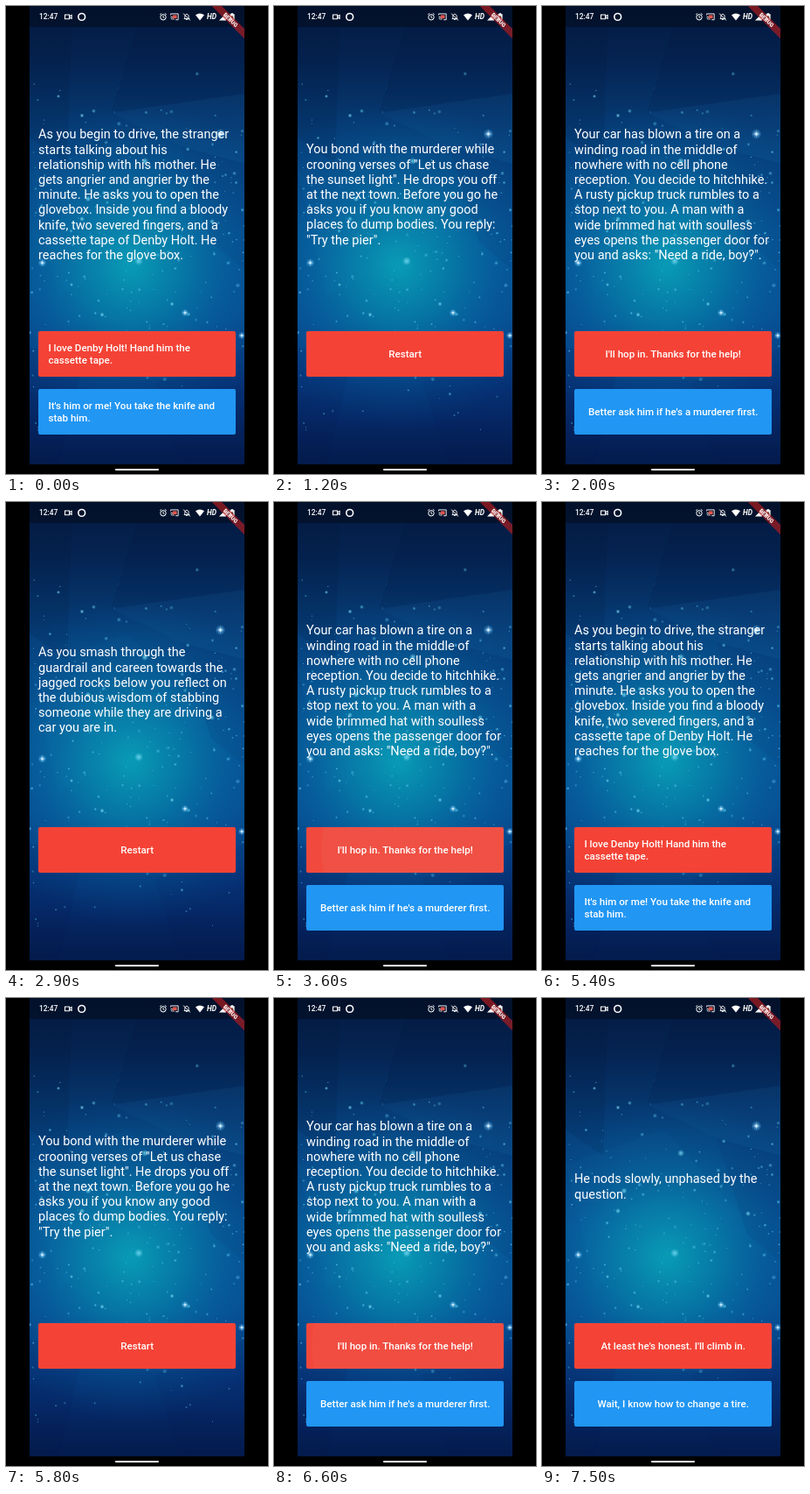
These frames come from a looping animation (300x534 px, 8 s). An HTML page with a canvas:

```html
<!DOCTYPE html>
<html lang="en">
<head>
<meta charset="utf-8">
<title>Hitchhike story</title>
<style>
  html, body { margin: 0; width: 100%; height: 100%; overflow: hidden; background: #000; }
  #stage { position: relative; width: 300px; height: 534px; overflow: hidden; background: #000; color: #fff; font-family: Roboto, sans-serif; }
  #sky, #bar { position: absolute; left: 0; top: 0; }
  #story {
    position: absolute; left: 37px; top: 215.3px; margin: 0; transform: translateY(-50%);
    font-size: 14.53px; line-height: 17.22px; white-space: pre;
  }
  .choice {
    position: absolute; left: 37.4px; width: 225.6px; height: 52px; border-radius: 2px; overflow: hidden;
    display: flex; align-items: center; justify-content: center;
    font-weight: 500; font-size: 11.6px; line-height: 13.6px; white-space: pre;
  }
  .choice.wide { justify-content: flex-start; padding-left: 11px; width: 214.6px; }
  #red { top: 371.4px; background: #f44336; }
  #blue { top: 437.2px; background: #2196f3; }
  .choice span { position: relative; top: .5px; }
  .choice i { position: absolute; left: 0; top: 0; width: 226px; height: 52px; opacity: 0; }
  #handle { position: absolute; left: 125px; top: 528px; width: 50px; height: 2px; border-radius: 1px; background: #fff; }
</style>
</head>
<body>
<div id="stage">
  <canvas id="sky" width="300" height="534"></canvas>
  <p id="story"></p>
  <div id="red" class="choice"><i></i><span></span></div>
  <div id="blue" class="choice"><i></i><span></span></div>
  <svg id="bar" width="300" height="60" font-family="Roboto, sans-serif" fill="#fff">
    <defs><clipPath id="app"><rect x="27" width="246" height="60"/></clipPath></defs>
    <rect x="27" width="246" height="24" fill="#000" opacity=".36"/>
    <text x="38" y="15.4" font-size="8.4" font-weight="500">12:47</text>
    <path d="M67.5 10h5v4.8h-5zM72.5 12l2.6-1.6v4L72.5 13z" fill="none" stroke="#fff" stroke-width="1.1"/>
    <circle cx="86.7" cy="12.4" r="3.9" fill="none" stroke="#fff" stroke-width="1.6"/>
    <g fill="none" stroke="#fff">
      <circle cx="180" cy="12.8" r="3.2"/>
      <path d="M180 10.9v2.1l1.4.9M176.2 9.9l2-1.7M183.8 9.9l-2-1.7" stroke-width=".9"/>
      <path d="M188.6 10.4v-1.5h8.6v6.8h-3M188.6 12.2a3.5 3.5 0 0 1 3.5 3.5M188.6 14a1.7 1.7 0 0 1 1.7 1.7" stroke-width=".9"/>
    </g>
    <rect x="190.8" y="10.4" width="4.8" height="3.8" fill="#e0534b"/>
    <path d="M204 14.6c1-.8.8-2 .9-3 .1-1.4 1-2.3 2.1-2.3s2 .9 2.1 2.3c.1 1-.1 2.2.9 3zM206.1 15.4h1.8M203.2 8.6l7.6 7.8" fill="none" stroke="#fff"/>
    <path d="M217 10.3q5-3.6 10 0l-5 6.2z"/>
    <text x="230" y="15.4" font-size="8.4" font-weight="700" font-style="italic">HD</text>
    <path d="M252 8.4v8h-8z"/>
    <path d="M257.6 8.2h2.6v1h1.4v7.4h-5.4V9.2h1.4z"/>
    <path d="M259.4 10.3l-1.8 2.8h1.2v2.2l1.8-3h-1.2z" fill="#222"/>
    <g clip-path="url(#app)">
      <g transform="translate(273 0) rotate(45)">
        <rect x="-40" y="18.4" width="80" height="8" fill="#b71c1c" opacity=".66"/>
        <text y="24.7" font-size="6.3" font-weight="900" text-anchor="middle">DEBUG</text>
      </g>
    </g>
  </svg>
  <div id="handle"></div>
</div>
<script>
const LOOP = 8000;
const $ = id => document.getElementById(id);

const scenes = {
  tire: {
    text: 'Your car has blown a tire on a\nwinding road in the middle of\nnowhere with no cell phone\nreception. You decide to hitchhike.\nA rusty pickup truck rumbles to a\nstop next to you. A man with a\nwide brimmed hat with soulless\neyes opens the passenger door for\nyou and asks: "Need a ride, boy?".',
    red: "I'll hop in. Thanks for the help!",
    blue: "Better ask him if he's a murderer first."
  },
  nods: {
    text: 'He nods slowly, unphased by the\nquestion.',
    red: "At least he's honest. I'll climb in.",
    blue: 'Wait, I know how to change a tire.'
  },
  tape: {
    text: 'As you begin to drive, the stranger\nstarts talking about his\nrelationship with his mother. He\ngets angrier and angrier by the\nminute. He asks you to open the\nglovebox. Inside you find a bloody\nknife, two severed fingers, and a\ncassette tape of Denby Holt. He\nreaches for the glove box.',
    red: 'I love Denby Holt! Hand him the\ncassette tape.',
    blue: "It's him or me! You take the knife and\nstab him."
  },
  bond: {
    text: 'You bond with the murderer while\ncrooning verses of "Let us chase\nthe sunset light". He drops you off\nat the next town. Before you go he\nasks you if you know any good\nplaces to dump bodies. You reply:\n"Try the pier".',
    red: 'Restart'
  },
  cliff: {
    text: 'As you smash through the\nguardrail and careen towards the\njagged rocks below you reflect on\nthe dubious wisdom of stabbing\nsomeone while they are driving a\ncar you are in.',
    red: 'Restart'
  }
};

// press time, page change, end of ripple, button, next page
const taps = [
  [700, 900, 1200, 'red', 'bond'],
  [1500, 1600, 1700, 'red', 'tire'],
  [2010, 2200, 2400, 'red', 'tape'],
  [2700, 2800, 2900, 'blue', 'cliff'],
  [3300, 3400, 3700, 'red', 'tire'],
  [3900, 4050, 4300, 'blue', 'nods'],
  [4510, 4600, 4800, 'red', 'tape'],
  [5400, 5500, 5800, 'red', 'bond'],
  [6100, 6300, 6700, 'red', 'tire'],
  [7100, 7250, 7500, 'blue', 'nods']
];

function drawSky() {
  const g = $('sky').getContext('2d');
  let seed = 41;
  const rnd = () => (seed = seed * 16807 % 2147483647) / 2147483647;
  const fill = (grad, stops) => {
    stops.forEach(([at, color]) => grad.addColorStop(at, color));
    g.fillStyle = grad;
    g.fillRect(27, 0, 246, 523);
  };
  const glow = (x, y, r, color, a) => {
    const grad = g.createRadialGradient(x, y, 0, x, y, r);
    grad.addColorStop(0, `rgba(${color},${a})`);
    grad.addColorStop(1, `rgba(${color},0)`);
    g.fillStyle = grad;
    g.fillRect(x - r, y - r, 2 * r, 2 * r);
  };
  const shard = (color, ...p) => {
    g.fillStyle = color;
    g.beginPath();
    for (let i = 0; i < p.length; i += 2) g.lineTo(p[i], p[i + 1]);
    g.fill();
  };

  g.beginPath();
  g.rect(27, 0, 246, 523);
  g.clip();
  fill(g.createLinearGradient(0, 0, 0, 523), [
    [0, '#041a42'], [.12, '#052452'], [.3, '#06407c'], [.5, '#074f94'],
    [.68, '#074b92'], [.82, '#06357a'], [.92, '#052560'], [1, '#041b4c']
  ]);
  fill(g.createRadialGradient(143, 296, 5, 143, 296, 190), [
    [0, 'rgba(8,156,182,.96)'], [.3, 'rgba(6,134,172,.74)'],
    [.65, 'rgba(6,104,160,.34)'], [1, 'rgba(6,80,145,0)']
  ]);

  shard('rgba(0,10,40,.1)', 27, 24, 75, 24, 70, 180, 27, 150);
  shard('rgba(0,10,50,.1)', 150, 24, 273, 24, 273, 100, 120, 122);
  shard('rgba(40,140,200,.05)', 120, 122, 273, 100, 273, 180, 200, 160);
  shard('rgba(30,140,200,.05)', 27, 190, 140, 150, 230, 250, 60, 330);
  shard('rgba(0,20,70,.07)', 200, 160, 273, 180, 273, 300, 235, 270);
  shard('rgba(0,20,70,.08)', 27, 390, 90, 400, 60, 523, 27, 523);
  shard('rgba(0,20,70,.07)', 170, 430, 273, 390, 273, 523, 200, 523);

  for (let i = 0; i < 230; i++) {
    const x = 27 + rnd() * 246;
    const y = 50 + (rnd() + rnd()) / 2 * 470;
    glow(x, y, .9 + rnd() * rnd() * 2.2, '95,205,240', .35 + rnd() * .5);
  }
  for (const [x, y, r] of [[159, 177, 4], [87, 125, 2.5], [94, 220, 3.5], [152, 291, 5],
    [87, 243, 3], [190, 340, 2.5], [110, 352, 2.5], [75, 318, 2], [236, 246, 3], [60, 103, 2]])
    glow(x, y, r, '120,220,245', .85);
  for (const [x, y, r] of [[245.5, 146, 6], [41.5, 293, 5], [205, 350, 4.5], [270, 376, 4.5]]) {
    glow(x, y, r, '110,200,255', .8);
    glow(x, y, r * .45, '255,255,255', 1);
    g.fillStyle = 'rgba(200,240,255,.5)';
    g.fillRect(x - r * .7, y - .3, r * 1.4, .6);
    g.fillRect(x - .3, y - r * .7, .6, r * 1.4);
  }
}

function setChoice(id, label) {
  const box = $(id);
  box.style.display = label ? '' : 'none';
  box.classList.toggle('wide', !!label && label.includes('\n'));
  box.querySelector('span').textContent = label || '';
}

let shown;
function show(name) {
  if (name === shown) return;
  shown = name;
  const s = scenes[name];
  $('story').textContent = s.text;
  setChoice('red', s.red);
  setChoice('blue', s.blue);
}

function ripple(id, t) {
  const ink = $(id).querySelector('i');
  const tap = taps.find(p => p[3] === id && t >= p[0] && t < p[2]);
  if (!tap) { ink.style.opacity = 0; return; }
  const [down, turn, end] = tap;
  const alpha = t < turn ? Math.min(1, (t - down) / 80) : (end - t) / (end - turn);
  const r = 20 + 130 * (t - down) / (end - down);
  ink.style.opacity = alpha;
  ink.style.background =
    `radial-gradient(circle at 60% 50%, rgba(200,200,200,.3) ${r}px, rgba(190,190,190,.16) ${r + 1}px)`;
}

const start = performance.now();
function frame(now) {
  const t = Math.max(0, now - start) % LOOP;
  let page = 'tape';
  for (const tap of taps) if (t >= tap[1]) page = tap[4];
  show(page);
  ripple('red', t);
  ripple('blue', t);
  requestAnimationFrame(frame);
}

drawSky();
frame(start);
</script>
</body>
</html>
```
